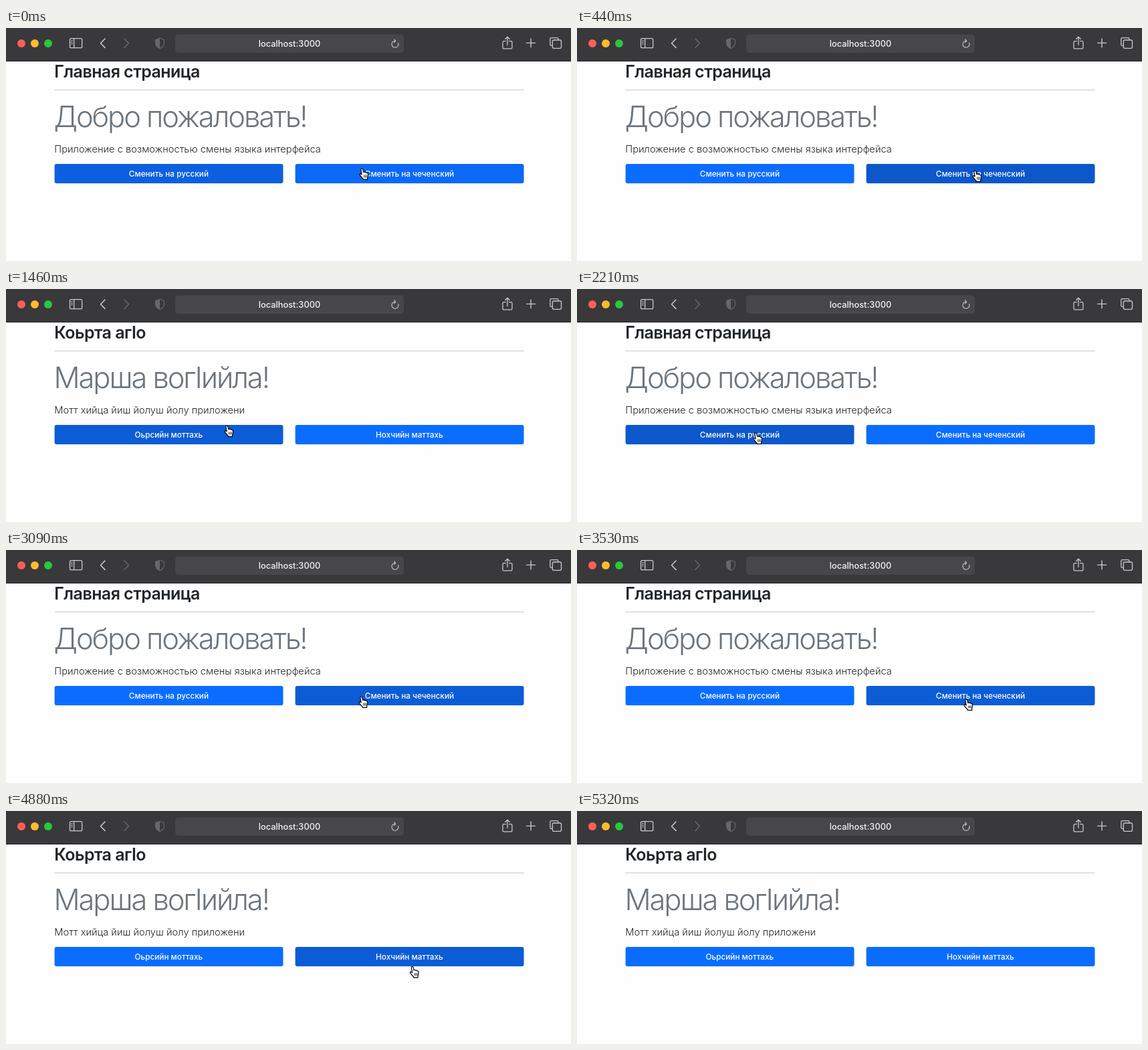
An HTML page with a canvas for the animation above (5480 ms loop, 845 by 348 pixels).

```html
<!DOCTYPE html>
<html lang="ru">
<head>
<meta charset="utf-8">
<title>localhost:3000</title>
<style>
html, body { margin: 0; width: 100%; height: 100%; overflow: hidden; background: #fefefe; }
canvas { display: block; width: 845px; height: 348px; }
</style>
</head>
<body>
<canvas id="stage" width="845" height="348"></canvas>
<script>
const ctx = document.getElementById('stage').getContext('2d');
const LOOP = 5480;
const FONT = 'Inter, Roboto, sans-serif';

const TEXTS = {
  ru: ['Главная страница', 'Добро пожаловать!',
       'Приложение с возможностью смены языка интерфейса',
       'Сменить на русский', 'Сменить на чеченский'],
  ce: ['Коьрта агӀо', 'Марша вогӀийла!',
       'Мотт хийца йиш йолуш йолу приложени',
       'Оьрсийн моттахь', 'Нохчийн маттахь']
};

// Button shade: 0 = idle, 1 = hovered, 1.3 = pressed.
// [time, pointer x, pointer y, left shade, right shade, language]
const STEPS = [
  [0, 536, 218, .75, .22, 'ru'],
  [140, 570, 219, 0, 1, 'ru'],
  [290, 590, 220, 0, 1, 'ru'],
  [440, 599, 221, 0, 1.3, 'ru'],
  [580, 600, 221, 0, 1.3, 'ce'],
  [730, 600, 221, 0, 1, 'ce'],
  [1020, 595, 220, 0, 1, 'ce'],
  [1170, 540, 216, 0, 1, 'ce'],
  [1320, 410, 212, .3, .3, 'ce'],
  [1460, 334, 212, 1, 0, 'ce'],
  [1610, 296, 216, 1, 0, 'ce'],
  [1760, 278, 221, 1, 0, 'ce'],
  [1910, 271, 223, 1, 0, 'ce'],
  [2060, 271, 223, 1.3, 0, 'ce'],
  [2210, 271, 223, 1.25, 0, 'ru'],
  [2360, 271, 223, 1, 0, 'ru'],
  [2500, 276, 223, 1, 0, 'ru'],
  [2650, 310, 222, 1, 0, 'ru'],
  [2800, 385, 222, 1, 0, 'ru'],
  [2940, 470, 224, .2, .8, 'ru'],
  [3090, 535, 227, 0, 1, 'ru'],
  [3240, 570, 229, 0, 1, 'ru'],
  [3390, 582, 230, 0, 1, 'ru'],
  [3530, 586, 231, 0, 1, 'ru'],
  [4280, 586, 231, 0, 1.3, 'ru'],
  [4430, 586, 231, 0, 1, 'ce'],
  [4880, 611.5, 240.5, 0, 1, 'ce'],
  [5020, 690, 280, 0, .3, 'ce'],
  [5170, 803, 340, 0, 0, 'ce'],
  [5320, 900, 400, 0, 0, 'ce']
];

function text(str, x, y, size, weight, color, spacing = 0, align = 'left') {
  ctx.font = `${weight} ${size}px ${FONT}`;
  ctx.letterSpacing = `${spacing}px`;
  ctx.textAlign = align;
  ctx.fillStyle = color;
  ctx.fillText(str, x, y);
}

function box(x, y, w, h, r, color) {
  ctx.fillStyle = color;
  ctx.beginPath();
  ctx.roundRect(x, y, w, h, r);
  ctx.fill();
}

function dot(x, y, r, color) {
  ctx.fillStyle = color;
  ctx.beginPath();
  ctx.arc(x, y, r, 0, Math.PI * 2);
  ctx.fill();
}

function line(d, color, width = 1.3) {
  ctx.strokeStyle = color;
  ctx.lineWidth = width;
  ctx.lineCap = ctx.lineJoin = 'round';
  ctx.stroke(new Path2D(d));
}

function toolbar() {
  const light = '#c9c8ca', dim = '#68676a';
  box(0, 0, 845, 49, 0, '#39383a');
  box(0, 49, 845, 1, 0, '#222123');
  dot(23, 23, 6, '#ff5f57');
  dot(43, 23, 6, '#febc2e');
  dot(63, 23, 6, '#28c840');

  line('M97.5 15.7h14.2q2 0 2 2v10q0 2-2 2h-14.2q-2 0-2-2v-10q0-2 2-2zM101.7 15.7v14', light);
  line('M97.5 18.8h2M97.5 21.3h2M97.5 23.8h2', light, 1);
  line('M148 16l-6.5 6.7 6.5 6.7', light, 1.6);
  line('M177 16l6.5 6.7-6.5 6.7', dim, 1.6);

  const shield = 'M230 15.3l6.3 2.2v5.5q0 4.6-6.3 7.6q-6.3-3-6.3-7.6v-5.5z';
  line(shield, dim, 1.2);
  ctx.fillStyle = dim;
  ctx.fill(new Path2D('M230 15.3v15.3q-6.3-3-6.3-7.6v-5.5z'));

  box(253, 9.5, 342, 27.5, 5, '#474648');
  text('localhost:3000', 424, 28, 12.8, 500, '#f4f4f4', 0, 'center');
  line('M586.6 22.4a5 5 0 1 1-4.4-3.2M580.4 16.8l2.3 2.5-2.4 2.3', light, 1.1);

  line('M747.3 19.6h-2.8q-1.6 0-1.6 1.6v8q0 1.6 1.6 1.6h10.8q1.6 0 1.6-1.6v-8q0-1.6-1.6-1.6h-2.8', light);
  line('M749.9 25.3v-11.8M746.6 16.5l3.3-3.2 3.3 3.2', light);
  line('M785 16v12.8M778.6 22.4h12.8', light, 1.4);
  line('M816.5 26.4h-1q-1.7 0-1.7-1.7v-8.3q0-1.8 1.8-1.8h8.6q1.7 0 1.7 1.7v1', light);
  line('M819.3 18h9.2q2 0 2 2v8.3q0 2-2 2h-9.2q-2 0-2-2v-8.3q0-2 2-2z', light);
}

function button(x, label, shade) {
  const mix = (a, b) => Math.round(a + (b - a) * shade);
  box(x, 203, 341.9, 29, 3, `rgb(${mix(11, 12)},${mix(109, 92)},${mix(255, 214)})`);
  text(label, x + 170.8, 221.6, 11.75, 550, '#fff', 0, 'center');
}

function pointer(x, y) {
  ctx.save();
  ctx.translate(x - 7.5, y - 8.7);
  const hand = new Path2D('M3.6 9.6L2.4 2.9Q2 1 3.5 .7Q4.9 .5 5.3 2.2L6.1 6' +
    'Q7.5 5 8.5 6.3Q9.9 5.5 10.8 7Q12.6 6.6 12.9 8.6Q13.4 11.5 12.2 14.4' +
    'L12 17H5.8L5.3 15.4Q3 13.6 .8 10.3Q0 8.5 1.5 8.3Q2.7 8.3 3.6 9.6z');
  ctx.fillStyle = '#fff';
  ctx.fill(hand);
  ctx.strokeStyle = '#000';
  ctx.lineWidth = 1.2;
  ctx.lineJoin = 'round';
  ctx.stroke(hand);
  line('M7 10.6l.2 3.2M8.9 10.5l.1 3.3M10.8 10.4v3.3', '#000', .8);
  ctx.restore();
}

function draw(t) {
  const [, x, y, left, right, lang] = STEPS.findLast(s => s[0] <= t);
  const [title, hello, note, first, second] = TEXTS[lang];
  box(0, 0, 845, 348, 0, '#fefefe');
  toolbar();
  text(title, 72.3, 74, 25, 600, '#212529', -0.55);
  box(72.6, 92, 701.9, 1, 0, '#c7c8c9');
  text(hello, 71.5, 147.5, 43.5, 300, '#6c757d', -2.1);
  text(note, 72.3, 186, 14.7, 300, '#212529', 0);
  button(72.6, first, left);
  button(432.6, second, right);
  pointer(x, y);
}

function frame(now) {
  draw(now % LOOP);
  requestAnimationFrame(frame);
}
draw(0);
requestAnimationFrame(frame);
</script>
</body>
</html>
```
